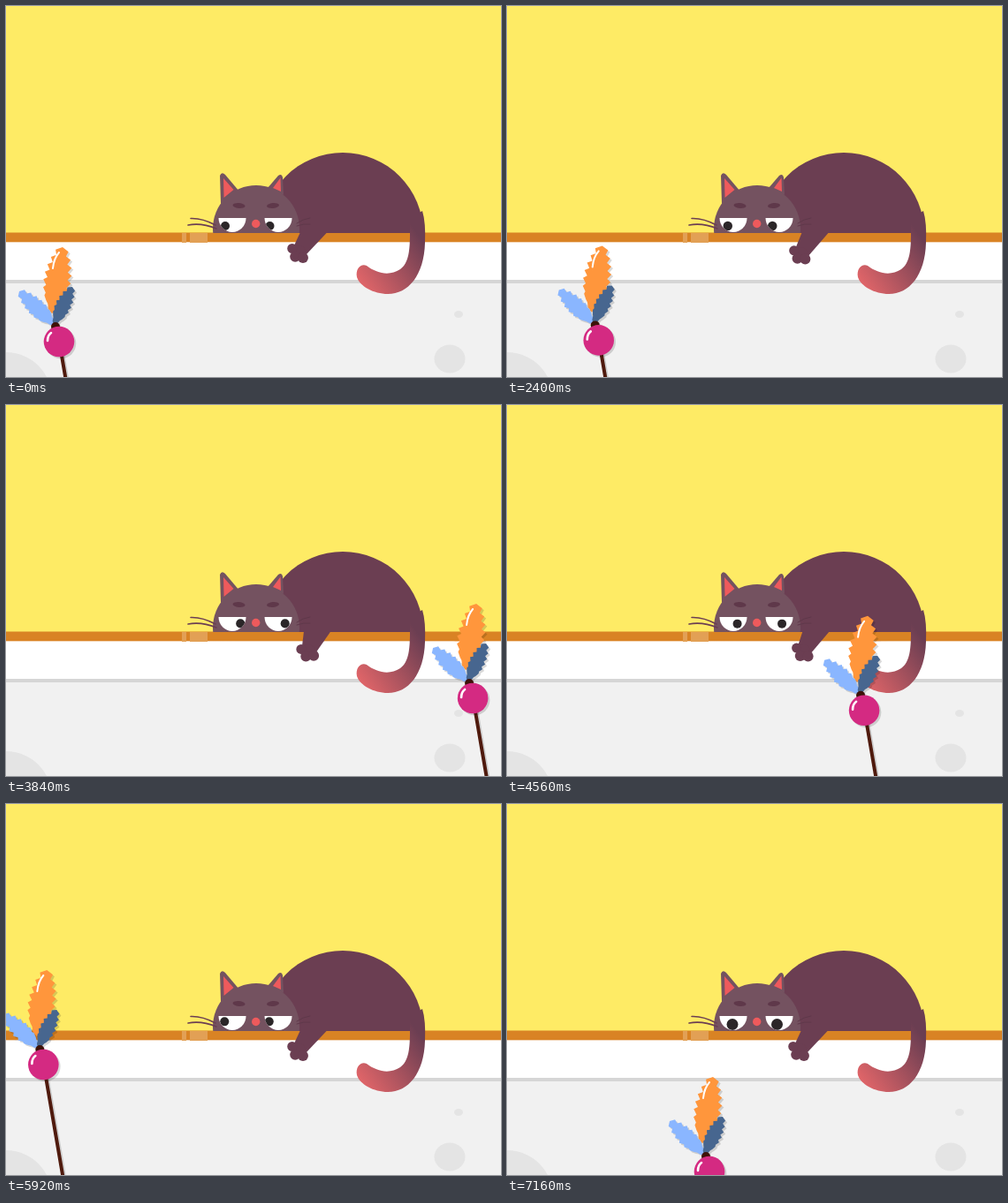
Animation, 560 px wide and 420 px high, one loop 8000 ms. Source, as an HTML page with a canvas:

```html
<!DOCTYPE html>
<html lang="en">
<head>
<meta charset="utf-8">
<title>Cat and feather toy</title>
<style>
  html, body { margin: 0; width: 100%; height: 100%; overflow: hidden; }
  canvas { display: block; }
</style>
</head>
<body>
<canvas id="stage" width="560" height="420"></canvas>
<script>
const ctx = document.getElementById('stage').getContext('2d');
const LOOP = 8000;
const BODY = '#6b3e52', HEAD = '#745260', RED = '#ee5a5c';

// Keys: time, then values that ease from one key to the next.
const TOY = [
  { t: 2200, v: [60, 380] },
  { t: 2960, v: [331, 370] },
  { t: 3120, v: [331, 370], lift: 77 },
  { t: 3900, v: [531, 335] },
  { t: 3960, v: [531, 335], power: 1.37, lift: -12 },
  { t: 5280, v: [40, 343] },
  { t: 5480, v: [40, 343] },
  { t: 6400, v: [45, 240] },
  { t: 7160, v: [229, 416] }
];
const PUPIL = [
  { t: 2200, v: [248, 249, 5] },
  { t: 2960, v: [259, 248.5, 6.5] },
  { t: 3120, v: [259, 248.5, 6.5], lift: 3 },
  { t: 3900, v: [265.3, 247.5, 5] },
  { t: 3960, v: [265.3, 247.5, 5], power: 1.37 },
  { t: 5280, v: [247, 248, 5] },
  { t: 5480, v: [247, 248, 5] },
  { t: 6400, v: [247.5, 244.5, 5] },
  { t: 7160, v: [255, 249.5, 6.5] }
];
const PAW = [
  { t: 2200, v: [331, 279, 0] },
  { t: 2960, v: [338, 291, 5] },
  { t: 3120, v: [338, 291, 5] },
  { t: 3900, v: [342, 279, 4] },
  { t: 3960, v: [342, 279, 4] },
  { t: 5000, v: [331, 279, 0] }
];

const ease = s => (1 - Math.cos(Math.PI * s)) / 2;

function track(keys, t) {
  if (t <= keys[0].t) return keys[0].v;
  const next = keys.findIndex(k => k.t > t);
  if (next < 0) return keys[keys.length - 1].v;
  const a = keys[next - 1], b = keys[next];
  const e = ease(((t - a.t) / (b.t - a.t)) ** (a.power || 1));
  const out = a.v.map((n, i) => n + (b.v[i] - n) * e);
  out[1] -= (a.lift || 0) * Math.sin(Math.PI * e);
  return out;
}

function rect(color, x, y, w, h) {
  ctx.fillStyle = color;
  ctx.fillRect(x, y, w, h);
}

function oval(color, x, y, rx, ry = rx, angle = 0) {
  ctx.fillStyle = color;
  ctx.beginPath();
  ctx.ellipse(x, y, rx, ry, angle, 0, Math.PI * 2);
  ctx.fill();
}

function shape(color, d) {
  ctx.fillStyle = color;
  ctx.fill(new Path2D(d));
}

function line(color, width, d) {
  ctx.strokeStyle = color;
  ctx.lineWidth = width;
  ctx.lineCap = 'round';
  ctx.stroke(new Path2D(d));
}

function room() {
  rect('#feeb65', 0, 0, 560, 257);
  rect('#d98324', 0, 256.5, 560, 11);
  rect('#ffffff', 0, 267.5, 560, 43);
  rect('#d6d6d6', 0, 310, 560, 4);
  rect('#f1f1f1', 0, 314, 560, 106);
  oval('#e4e4e4', 0, 444, 52);
  oval('#e4e4e4', 502, 399.5, 17.5, 16);
  oval('#e4e4e4', 512, 349, 5, 4);
  rect('#e2a055', 199, 257, 5, 11);
  rect('#e2a055', 208, 257, 20, 11);
}

function heart(t) {
  if (t < 680 || t >= 2240) return;
  const p = Math.min(1, (t - 640) / 600);
  ctx.save();
  ctx.globalAlpha = 1 - 0.87 * p;
  ctx.translate(281 + 15 * p, 208 - 34 * p);
  shape(RED, 'M0 6 C-4 3 -6 1 -6 -2 C-6 -6 -1 -6 0 -3 C1 -6 6 -6 6 -2 C6 1 4 3 0 6Z');
  ctx.restore();
}

function body() {
  ctx.fillStyle = BODY;
  ctx.beginPath();
  ctx.arc(381, 257, 91, Math.PI, 0);
  ctx.fill();
  const fade = ctx.createLinearGradient(402, 312, 470, 264);
  fade.addColorStop(0, '#dd6468');
  fade.addColorStop(1, BODY);
  shape(fade, 'M457 240 L471 232 Q475 245 474 268 C473 305 455 326 432 326 ' +
    'C416 326 400 317 397 307 C395 297 402 291 408 294 ' +
    'C420 303 434 306 446 298 C456 291 457 275 457 257Z');
}

function face(t) {
  shape(HEAD, 'M243 224 L242 192 Q244 187 248 191 L264 210Z');
  shape(RED, 'M246.5 217 L246 195 L257.5 208Z');
  shape(HEAD, 'M296 206 L308 192 Q312 189 313 194 L314 214Z');
  shape(RED, 'M302 206 L310.5 194.5 L311 210Z');

  ctx.save();
  ctx.beginPath();
  ctx.rect(200, 180, 160, 77);
  ctx.clip();
  oval(HEAD, 283, 252, 49);
  ctx.restore();

  oval('#5f384a', 263.5, 226, 7, 3, 0.1);
  oval('#5f384a', 302, 226, 7, 3, -0.1);

  const [px, py, r] = track(PUPIL, t);
  for (const dx of [0, 51]) {
    ctx.save();
    ctx.beginPath();
    ctx.ellipse(256 + dx * 1.02, 240, 15.5, 16, 0, 0, Math.PI);
    ctx.clip();
    rect('#ffffff', 230 + dx, 239, 60, 18);
    oval('#2b2628', px + dx * 0.99, py, r);
    ctx.restore();
  }
  oval(RED, 282.7, 246.5, 4.7);

  line('#6b3e52', 1.6, 'M237 248 Q222 240 209 240.5 M238 252 Q221 245 206 248');
  line('#5f384a', 1, 'M329 246 Q336 241 344 240 M329 249 Q337 246 344 247');
}

function arm(t) {
  const [x, y, shift] = track(PAW, t);
  const dx = x - 348 - shift, dy = y - 256, len = Math.hypot(dx, dy);
  const ux = dx / len, uy = dy / len, nx = -uy, ny = ux;
  const at = (along, side) => [x + ux * along + nx * side, y + uy * along + ny * side];
  ctx.fillStyle = BODY;
  ctx.beginPath();
  ctx.moveTo(333 + shift, 256);
  ctx.lineTo(...at(0, 8));
  ctx.lineTo(...at(0, -8));
  ctx.lineTo(363.5 + shift, 256);
  ctx.fill();
  oval(BODY, x, y, 8);
  oval(BODY, ...at(0.7, 8.5), 5.5);
  oval(BODY, ...at(6, 0.3), 6);
  oval(BODY, ...at(1.8, -7.5), 6);
}

function feather(color, baseX, baseY, tipX, tipY, width, teeth) {
  ctx.save();
  ctx.translate(baseX, baseY);
  ctx.rotate(Math.atan2(tipY - baseY, tipX - baseX));
  const len = Math.hypot(tipX - baseX, tipY - baseY);
  const half = s => width * Math.sin(Math.PI * s ** 0.85) ** 0.7;
  const points = [];
  for (let i = 0; i < teeth; i++) {
    const s = (i + 0.5) / (teeth + 0.6);
    points.push([s * len, half(s) * 0.78], [(s + 0.6 / teeth) * len, half(s) * 1.05]);
  }
  ctx.fillStyle = color;
  ctx.beginPath();
  ctx.moveTo(0, 0);
  points.forEach(p => ctx.lineTo(p[0], p[1]));
  ctx.lineTo(len, 0);
  points.reverse().forEach(p => ctx.lineTo(p[0], -p[1]));
  ctx.closePath();
  ctx.fill();
  ctx.restore();
}

function toy(t) {
  const [x, y] = track(TOY, t);
  ctx.save();
  ctx.translate(x, y);
  ctx.shadowColor = 'rgba(0, 0, 0, 0.15)';
  ctx.shadowOffsetX = ctx.shadowOffsetY = 2;
  line('#4f1a0d', 4, 'M2 10 L53 307');
  feather('#ff963c', -8, -32, 4, -107, 15, 8);
  feather('#8ab6ff', -5, -19, -45, -57, 10, 7);
  feather('#47668f', -6, -19, 15, -62, 9, 7);
  oval('#3d1208', -4, -17, 5);
  oval('#d42a82', 0, 0, 17.3);
  ctx.shadowColor = 'transparent';
  line('#ffffff', 2, 'M0 -101 Q-6 -94 -7 -83');
  line('#ffffff', 2.6, 'M-13 -1 Q-13 -7 -9 -10');
  ctx.restore();
}

function draw(t) {
  room();
  body();
  heart(t);
  face(t);
  arm(t);
  toy(t);
}

let start;
function tick(now) {
  start ??= now;
  draw((now - start) % LOOP);
  requestAnimationFrame(tick);
}
draw(0);
requestAnimationFrame(tick);
</script>
</body>
</html>
```
